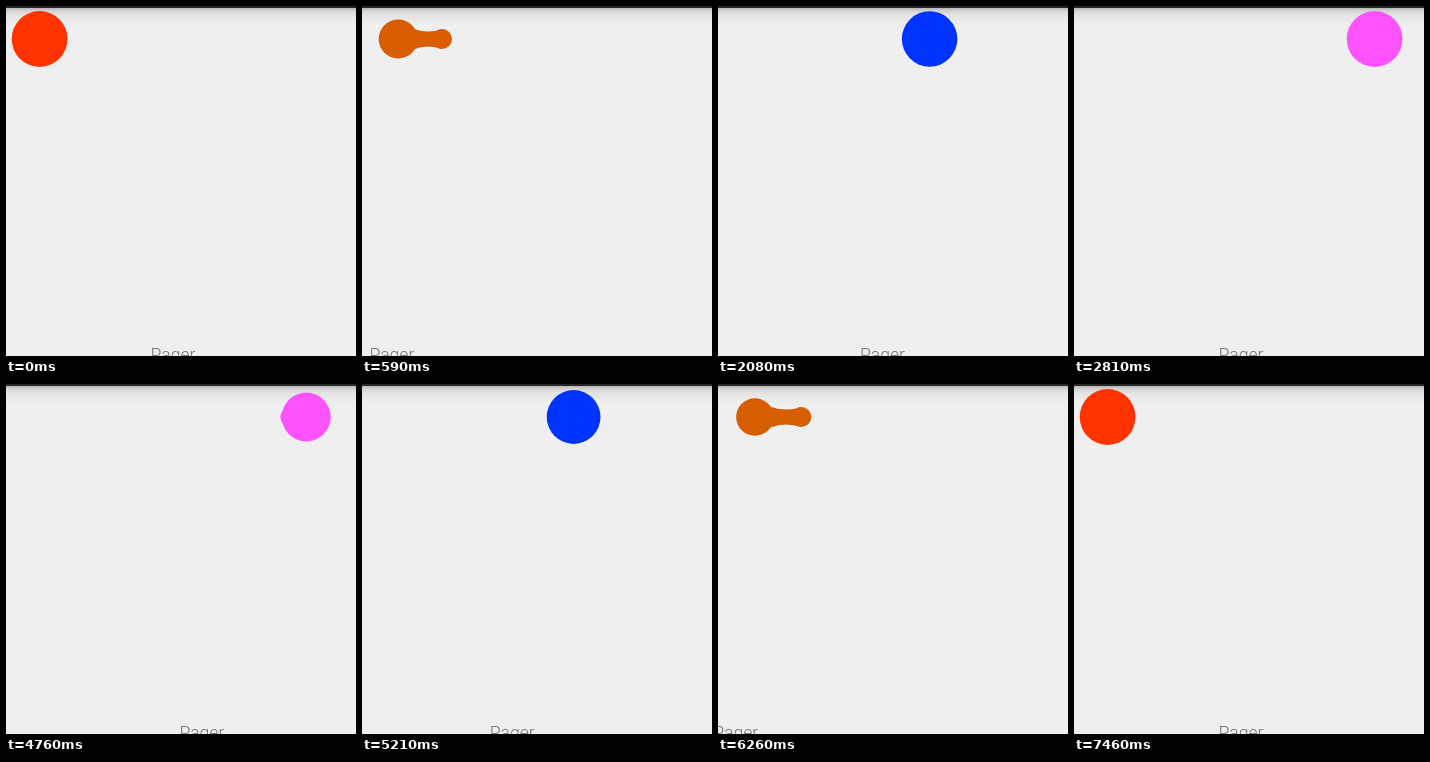
Recreate the animation shown at these times as an HTML page with a canvas. Size 350 by 350 pixels, loop 7560 ms.

```html
<!DOCTYPE html>
<html lang="en">
<head>
<meta charset="utf-8">
<title>Pager indicator</title>
<style>
  html, body { margin: 0; width: 100%; height: 100%; overflow: hidden; background: #efefef; }
  canvas { display: block; width: 350px; height: 350px; }
</style>
</head>
<body>
<canvas id="stage"></canvas>
<script>
const SIZE = 350, LOOP = 7560, STEP = 150;
const PAGE_WIDTH = 445, TAB_X = 33.6, TAB_GAP = 89, TAB_Y = 33;
const R_MAX = 27.9, R_MIN = 10, SHRINK_SPAN = 0.66;

// Each swipe is first seen at `at`, when it has already run for `lead` ms.
const swipes = [
  { at: 300, lead: 5, duration: 420, from: 0, to: 1 },
  { at: 1190, lead: 16, duration: 400, from: 1, to: 2 },
  { at: 2080, lead: 20, duration: 450, from: 2, to: 3 },
  { at: 4760, lead: 96, duration: 618, from: 3, to: 2 },
  { at: 5810, lead: 196, duration: 873, from: 2, to: 0 }
];

const colorStops = [
  { at: 0, rgb: [255, 51, 0] },
  { at: 0.33, rgb: [215, 94, 0] },
  { at: 1, rgb: [3, 220, 20] },
  { at: 2, rgb: [0, 51, 255] },
  { at: 3, rgb: [255, 82, 255] }
];

const canvas = document.getElementById('stage');
const ctx = canvas.getContext('2d');
const ratio = window.devicePixelRatio || 1;
canvas.width = canvas.height = SIZE * ratio;
ctx.scale(ratio, ratio);

const lerp = (a, b, k) => a + (b - a) * k;
const clamp = k => Math.min(1, Math.max(0, k));
const smooth = k => k * k * (3 - 2 * k);

function scrollAt(time) {
  const swipe = swipes.findLast(s => time >= s.at);
  if (!swipe) return 0;
  const held = Math.floor((time - swipe.at) / STEP) * STEP;
  const progress = clamp((held + swipe.lead) / swipe.duration);
  return lerp(swipe.from, swipe.to, smooth(progress));
}

function colorAt(position) {
  const next = Math.max(1, colorStops.findIndex(stop => stop.at >= position));
  const a = colorStops[next - 1], b = colorStops[next];
  const k = smooth((position - a.at) / (b.at - a.at));
  return `rgb(${a.rgb.map((c, i) => Math.round(lerp(c, b.rgb[i], k))).join(',')})`;
}

function drawBackground() {
  ctx.fillStyle = '#efefef';
  ctx.fillRect(0, 0, SIZE, SIZE);
  const shadow = ctx.createLinearGradient(0, 2, 0, 19);
  shadow.addColorStop(0, '#b8b7b7');
  shadow.addColorStop(0.15, '#d2d1d1');
  shadow.addColorStop(0.4, '#e4e3e3');
  shadow.addColorStop(1, '#efefef');
  ctx.fillStyle = shadow;
  ctx.fillRect(0, 2, SIZE, 17);
  ctx.fillStyle = '#282627';
  ctx.fillRect(0, 0, SIZE, 2);
}

function drawLabels(position) {
  ctx.font = '300 17.6px Roboto, sans-serif';
  ctx.fillStyle = '#757575';
  ctx.textAlign = 'center';
  for (let page = 0; page < 4; page++) {
    ctx.fillText('Pager', 167 + (page - position) * PAGE_WIDTH, 354.8);
  }
}

function drawDisc({ x, r }) {
  ctx.beginPath();
  ctx.arc(x, TAB_Y, r, 0, Math.PI * 2);
  ctx.fill();
}

function drawNeck(a, b) {
  const midX = (a.x + b.x) / 2;
  const waist = Math.min(a.r, b.r) * 0.2;
  ctx.beginPath();
  ctx.moveTo(a.x, TAB_Y - a.r);
  ctx.quadraticCurveTo(midX, TAB_Y - waist, b.x, TAB_Y - b.r);
  ctx.lineTo(b.x, TAB_Y + b.r);
  ctx.quadraticCurveTo(midX, TAB_Y + waist, a.x, TAB_Y + a.r);
  ctx.fill();
}

function drawIndicator(position) {
  const page = Math.floor(position);
  const offset = position - page;
  const tabX = TAB_X + page * TAB_GAP;
  const head = {
    x: tabX + TAB_GAP * (1 - (1 - offset) ** 2),
    r: lerp(R_MIN, R_MAX, clamp((offset - SHRINK_SPAN) / (1 - SHRINK_SPAN)))
  };
  const foot = {
    x: tabX + TAB_GAP * offset ** 3,
    r: lerp(R_MAX, R_MIN, clamp(offset / SHRINK_SPAN))
  };
  ctx.fillStyle = colorAt(position);
  drawDisc(foot);
  if (offset > 0) {
    drawDisc(head);
    drawNeck(foot, head);
  }
}

function render(time) {
  const position = scrollAt(time);
  drawBackground();
  drawLabels(position);
  drawIndicator(position);
}

const startTime = performance.now();
function tick() {
  render((performance.now() - startTime) % LOOP);
  requestAnimationFrame(tick);
}
tick();
</script>
</body>
</html>
```
